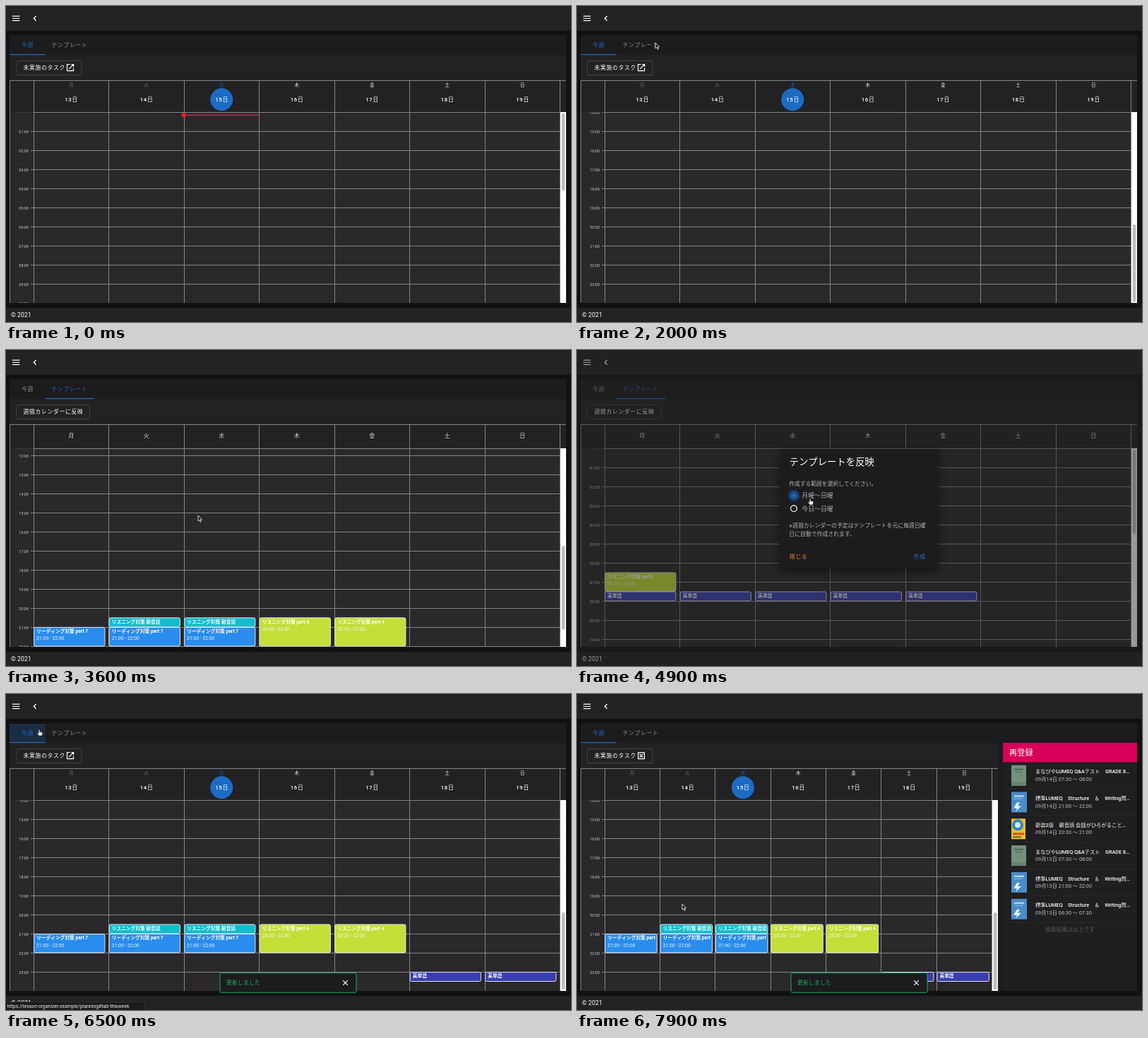
An HTML page with a canvas for the animation above (8 s loop, 800 px wide and 447 px high).

```html
<!DOCTYPE html>
<html lang="ja">
<head>
<meta charset="utf-8">
<title>週間スケジュール</title>
<style>
html, body { margin: 0; width: 100%; height: 100%; overflow: hidden; background: #121114; }
canvas { display: block; width: 800px; height: 447px; }
</style>
</head>
<body>
<canvas id="stage"></canvas>
<script>
const LOOP = 8000, W = 800, H = 447;
const canvas = document.getElementById('stage');
const ctx = canvas.getContext('2d');
const dpr = window.devicePixelRatio || 1;
canvas.width = W * dpr;
canvas.height = H * dpr;

const FONT = 'Roboto, "Noto Sans CJK JP", "Noto Sans CJK", sans-serif';
const SURFACE = '#222124', DARK = '#1c1b1e', LINE = '#858487', BLUE = '#1c6cc4';
const LIME = '#c4df38', INDIGO = '#393eb0', SKY = '#298dee', CYAN = '#13bccd';
const DAYS = [...'月火水木金土日'];
const HOUR = 27;
const PANEL_OPEN = 7200;

// day, start hour, end hour, colour, title
const EVENTS = [
  [0, 6.5, 7.5, LIME, 'リスニング対策 part4'],
  ...[0, 1, 2, 3, 4].map(d => [d, 7.5, 8, INDIGO, '英単語']),
  ...[1, 2].map(d => [d, 20.5, 21, CYAN, 'リスニング対策 朝音読']),
  ...[0, 1, 2].map(d => [d, 21, 22, SKY, 'リーディング対策 part 7']),
  ...[3, 4].map(d => [d, 20.5, 22, LIME, 'リスニング対策 part 4']),
  ...[5, 6].map(d => [d, 23, 23.5, INDIGO, '英単語'])
];

const BOOKS = [
  { title: 'まなびやLUMEQ Q&Aテスト　GRADE 8…', cover: 'green' },
  { title: '標準LUMEQ　Structure　＆　Writing問…', cover: 'blue' },
  { title: '新装2版　朝音読 会話がひろがること…', cover: 'yellow' }
];
const TASKS = [
  [0, '09月14日 07:30 〜 08:00'], [1, '09月14日 21:00 〜 22:00'],
  [2, '09月14日 20:30 〜 21:00'], [0, '09月13日 07:30 〜 08:00'],
  [1, '09月13日 21:00 〜 22:00'], [1, '09月13日 06:30 〜 07:30']
];

// Motion tracks: time followed by values
const POINTER = [
  [100, 530, 250], [700, 344, 175], [1700, 344, 175], [1900, 313, 141], [2000, 111, 52],
  [2300, 111, 52], [2400, 100, 53], [2600, 100, 53], [2850, 272, 234], [4000, 272, 234],
  [4300, 92, 85], [4450, 92, 85], [4750, 330, 210], [4950, 330, 210], [5250, 485, 291],
  [5600, 485, 291], [6000, 47, 50], [6600, 47, 50], [6900, 92, 85], [7250, 92, 85], [7600, 149, 297]
];
const WEEK_SCROLL = [[1050, 0], [1300, 234], [1500, 340], [1750, 378]];
const TEMPLATE_SCROLL = [
  [2800, 0], [2900, 16], [3100, 120], [3400, 265], [3600, 314], [3750, 340], [3900, 250], [4200, 0]
];
const TAB = [[2400, 0], [2700, 1], [6100, 1], [6400, 0]];
const DIALOG = [[4400, 0], [4550, 1], [5350, 1], [5550, 0]];
const SNACK = [[5550, 0], [5700, 1]];
const HAND = [[2350, 2650], [4200, 4480], [4700, 5000], [5200, 5600], [5950, 6650], [6850, 7300]];

const linear = k => k;
const smooth = k => k * k * (3 - 2 * k);

function track(keys, t, ease = smooth) {
  if (t <= keys[0][0]) return keys[0].slice(1);
  const i = keys.findIndex(k => k[0] > t);
  if (i < 0) return keys[keys.length - 1].slice(1);
  const a = keys[i - 1], b = keys[i];
  const k = ease((t - a[0]) / (b[0] - a[0]));
  return a.slice(1).map((v, n) => v + (b[n + 1] - v) * k);
}

const within = (t, a, b) => t >= a && t < b;

function rect(x, y, w, h, color) {
  ctx.fillStyle = color;
  ctx.fillRect(x, y, w, h);
}

function box(x, y, w, h, r, fill, stroke, width = 1) {
  ctx.beginPath();
  ctx.roundRect(x, y, w, h, r);
  if (fill) { ctx.fillStyle = fill; ctx.fill(); }
  if (stroke) { ctx.strokeStyle = stroke; ctx.lineWidth = width; ctx.stroke(); }
}

function disc(x, y, r, fill, stroke, width = 1) {
  box(x - r, y - r, r * 2, r * 2, r, fill, stroke, width);
}

const hline = (x, y, w, color = LINE) => rect(x, Math.floor(y), w, 1, color);
const vline = (x, y, h, color = LINE) => rect(Math.floor(x), y, 1, h, color);

function path(d, x, y, fill, stroke, width) {
  const p = new Path2D(d);
  ctx.save();
  ctx.translate(x, y);
  if (fill) { ctx.fillStyle = fill; ctx.fill(p); }
  if (stroke) { ctx.strokeStyle = stroke; ctx.lineWidth = width; ctx.stroke(p); }
  ctx.restore();
}

// y is the middle of the line
function text(s, x, y, size, color, { weight = 400, gap = 0, align = 'left' } = {}) {
  ctx.font = `${weight} ${size}px ${FONT}`;
  ctx.letterSpacing = gap + 'px';
  ctx.textAlign = align;
  ctx.fillStyle = color;
  ctx.fillText(s, x, y + size * 0.37);
}

function clipped(x, y, w, h, draw) {
  ctx.save();
  ctx.beginPath();
  ctx.rect(x, y, w, h);
  ctx.clip();
  draw();
  ctx.restore();
}

const clock = h => String(Math.floor(h)).padStart(2, '0') + (h % 1 ? ':30' : ':00');

function drawEvent([day, from, to, color, title], x0, colW, y0) {
  const x = x0 + day * colW + 0.5, y = y0 + from * HOUR;
  const w = (colW - 1) * 0.95, h = (to - from) * HOUR;
  box(x + 0.2, y, w, h - 0.5, 2, color, '#f4f4f6', 0.9);
  clipped(x, y, w - 0.5, h, () => {
    text(title, x + 3.8, y + 5.3, 6.7, '#fff', { weight: 700 });
    if (to - from >= 1) text(`${clock(from)} - ${clock(to)}`, x + 3.8, y + 15.6, 6.8, '#f2f2f4');
  });
}

function drawHeader(week, x0, colW, top) {
  DAYS.forEach((day, i) => {
    const cx = x0 + (i + 0.5) * colW;
    if (!week) return text(day, cx, 121.5, 8, '#dddcde', { align: 'center' });
    const color = i < 2 ? '#747376' : i === 2 ? '#1c5fae' : '#f2f2f2';
    text(day, cx, 111.3, 6.5, color, { align: 'center' });
    if (i === 2) disc(cx, 132.3, 16, BLUE);
    text(13 + i + '日', cx + 0.3, 132.3, 7.8, '#fff', { weight: 500, gap: 0.7, align: 'center' });
  });
  hline(14, top, 25, '#3c3b3e');
}

function drawCalendar(week, scroll, events, right) {
  const top = week ? 150.5 : 139.5, x0 = 39, end = right - 8.5;
  const colW = (end - x0) / 7, view = 420 - top, y0 = top - scroll;
  rect(5, 69, right - 5, 351, SURFACE);
  rect(5, Math.floor(top), right - 5, 420 - Math.floor(top), '#2a282b');
  drawHeader(week, x0, colW, top);
  for (let i = 0; i <= 7; i++) vline(x0 + i * colW, 105, 315);

  clipped(5, top, right - 5, view, () => {
    for (let h = 1; h < 24; h++) {
      const y = y0 + h * HOUR;
      hline(35, y, end - 35);
      text(clock(h), 32, y + 0.6, 5.5, '#d0cfd1', { align: 'right' });
    }
    events.forEach(e => drawEvent(e, x0, colW, y0));
    if (week) {
      const x = x0 + 2 * colW, y = y0 + 3.8;
      rect(x, y - 0.6, colW, 1.2, '#d8344c');
      disc(x - 0.3, y, 3.2, '#ee1c28');
    }
  });

  hline(39, top, end - 39);
  hline(5, 105, right - 5);
  vline(5, 105, 315);
  rect(end + 0.5, Math.floor(top), 8, 420 - Math.floor(top), '#fff');
  const thumb = view * view / 648;
  box(end + 2.3, top + 1.2 + scroll * view / 648, 4.6, thumb - 2.4, 2.3, '#bdbdbf');
}

function drawButton(week, open) {
  box(14.5, 77.5, week ? 92.5 : 104, 20, 2, null, '#454447', 0.9);
  text(week ? '未実施のタスク' : '週間カレンダーに反映', 24.5, 87.3, 7.8, '#fff', { gap: 0.7 });
  if (!week) return;
  if (open) path('M-4.4-4.4h8.8v8.8h-8.8zM-2.3-2.3L2.3 2.3M2.3-2.3L-2.3 2.3', 91, 87.2, null, '#fff', 1.2);
  else path('M-.5-4.5h-4v9h9v-4M1.3-4.6h3.3v3.3M4.4-4.4L-2 2', 91, 87.2, null, '#fff', 1.2);
}

function drawCover(kind, x, y) {
  if (kind === 'green') {
    rect(x, y, 21, 29, '#74907e');
    rect(x + 4, y + 5, 13, 1.5, '#3f5a4b');
    rect(x + 6, y + 9, 9, 1, '#4d6858');
    rect(x, y + 24, 21, 5, '#67836f');
  } else if (kind === 'blue') {
    rect(x, y, 22, 29, '#4a8cc8');
    rect(x + 4, y + 5, 14, 2, '#c4dcf0');
    rect(x + 4, y + 9, 12, 1, '#9cc4e6');
    path('M8 15L3 23H8L6 28L14 20H9L12 15Z', x, y, '#e8f2fa');
  } else {
    rect(x, y, 20, 29, '#f0bd2c');
    disc(x + 9, y + 9, 8, '#2a86c8');
    disc(x + 9, y + 9, 4, '#dcebf2');
    rect(x + 2, y + 20, 16, 3, '#d8502c');
    rect(x + 2, y + 25, 12, 2, '#4c6a38');
  }
}

function drawPanel() {
  rect(596, 69, 197, 351, DARK);
  rect(603, 69, 190, 351, '#1f1e21');
  rect(603, 69, 190, 27.5, '#d80058');
  text('再登録', 612, 83, 11.2, '#fff');
  TASKS.forEach(([book, time], i) => {
    const y = 115.2 + i * 37.8;
    drawCover(BOOKS[book].cover, 615, y - 14.5);
    text(BOOKS[book].title, 649, y - 5.6, 7.3, '#fff', { weight: 500 });
    text(time, 649, y + 4.9, 7.3, '#c2c1c4');
    rect(603, y + 18.5, 190, 0.6, '#302f32');
  });
  text('検索結果は以上です', 698, 333, 7.8, '#58575a', { align: 'center' });
}

function drawChrome(tab, hover) {
  rect(0, 0, W, H, '#121114');
  rect(0, 35, W, 3, '#0d0c0f');
  rect(0, 0, W, 35.5, SURFACE);
  path('M9 14.3H19.3M9 17.5H19.3M9 20.7H19.3', 0, 0, null, '#fff', 1.2);
  path('M42.6 14.2L39.4 17.5L42.6 20.8', 0, 0, null, '#fff', 1.4);
  rect(0, 427, W, 20, SURFACE);
  text('© 2021', 7, 437, 8.8, '#fff');

  rect(5, 42, 788, 27, DARK);
  if (hover === 'week') rect(5, 42, 50.5, 27, 'rgba(25,118,210,.2)');
  if (hover === 'template') rect(55.5, 42, 69.5, 27, 'rgba(25,118,210,.2)');
  const onWeek = tab.target === 0;
  text('今週', 22, 55.6, 7.8, onWeek ? BLUE : '#8f8e91', { gap: 0.7 });
  text('テンプレート', 64.5, 55.6, 7.8, onWeek ? '#8f8e91' : BLUE, { gap: 0.7 });
}

function drawDialog(alpha, ripple) {
  if (!alpha) return;
  rect(0, 0, W, H, `rgba(33,33,33,${0.46 * alpha})`);
  ctx.save();
  ctx.globalAlpha = alpha;
  ctx.shadowColor = 'rgba(0,0,0,.45)';
  ctx.shadowBlur = 14 * dpr;
  ctx.shadowOffsetY = 5 * dpr;
  box(287, 140, 224.5, 167.5, 2.5, DARK);
  ctx.shadowColor = 'transparent';
  text('テンプレートを反映', 300.5, 158, 13.4, '#fff');
  text('作成する範囲を選択してください。', 300.3, 189.6, 7.75, '#b5b4b7');
  if (ripple) disc(307, 206, 8.5, '#17365c');
  disc(307, 206, 4.4, null, '#2079d6', 1.2);
  disc(307, 206, 2.4, '#2079d6');
  disc(307, 224.3, 4.4, null, '#fff', 1.2);
  text('月曜〜日曜', 318.3, 206, 8.9, '#b0afb2');
  text('今日〜日曜', 318.3, 224.3, 8.9, '#b0afb2');
  text('※週間カレンダーの予定はテンプレートを元に毎週日曜', 300.3, 247.6, 7.86, '#b5b4b7');
  text('日に自動で作成されます。', 300.3, 260, 7.86, '#b5b4b7');
  text('閉じる', 301, 292.3, 7.8, '#ee8a1e', { weight: 500, gap: 0.7 });
  text('作成', 476.7, 292.3, 7.8, '#1f74cc', { weight: 500, gap: 0.7 });
  ctx.restore();
}

function drawSnack(alpha) {
  if (!alpha) return;
  ctx.save();
  ctx.globalAlpha = alpha;
  box(303, 394.7, 193, 27.6, 2, DARK, '#13b152', 1);
  text('更新しました', 312, 408.5, 7.8, '#15b85a', { gap: 0.2 });
  path('M-3.3-3.3L3.3 3.3M3.3-3.3L-3.3 3.3', 480.5, 408.5, null, '#fff', 1.2);
  ctx.restore();
}

function drawStatus(hover) {
  if (!hover) return;
  const end = hover === 'week' ? 'thisweek' : 'template';
  box(-2, 435.7, 198.5, 14, 2, '#1b1a1d', '#39383b', 0.7);
  text('https://lesson-organizer.example/planning#tab-' + end, 1.5, 441.6, 6.9, '#f0f0f0');
}

function drawPointer(t) {
  if (t < 100) return;
  const [x, y] = track(POINTER, t);
  ctx.lineJoin = 'round';
  if (HAND.some(([a, b]) => within(t, a, b))) {
    path('M-.9 .8Q0-.4 .9 .8V3.4L4.3 4.2Q5 4.5 4.8 5.6L4 9H-.6L-3 5.6Q-3.2 4.6-2 4.8L-.9 5.8Z',
      x, y, '#fff', '#111', 0.6);
  } else {
    path('M0 0V8L1.9 6.3L3.2 9.3L4.5 8.8L3.2 5.9H5.6Z', x, y, '#111', '#fff', 0.8);
  }
  ctx.lineJoin = 'miter';
}

function draw(t) {
  const [p] = track(TAB, t);
  const tab = { p, target: within(t, 2400, 6100) ? 1 : 0 };
  const hover = within(t, 2350, 2650) ? 'template' : within(t, 5980, 6650) ? 'week' : null;
  const open = t >= PANEL_OPEN;

  ctx.setTransform(dpr, 0, 0, dpr, 0, 0);
  drawChrome(tab, hover);
  clipped(5, 69, 788, 351, () => {
    if (p < 1) {
      ctx.save();
      ctx.translate(-788 * p, 0);
      const [scroll] = track(WEEK_SCROLL, t, linear);
      drawCalendar(true, scroll, t > 5500 ? EVENTS : [], open ? 596 : 793);
      drawButton(true, open);
      if (open) drawPanel();
      ctx.restore();
    }
    if (p > 0) {
      ctx.save();
      ctx.translate(788 * (1 - p), 0);
      const [scroll] = track(TEMPLATE_SCROLL, t, linear);
      drawCalendar(false, scroll, EVENTS, 793);
      drawButton(false);
      ctx.restore();
    }
  });
  rect(5 + 50.5 * p, 68, 50.5 + 19 * p, 1.2, '#1a6cc0');
  drawDialog(track(DIALOG, t)[0], within(t, 4800, 5300));
  drawSnack(track(SNACK, t)[0]);
  drawStatus(hover);
  drawPointer(t);
}

const start = performance.now();
function frame() {
  draw((performance.now() - start) % LOOP);
  requestAnimationFrame(frame);
}
frame();
</script>
</body>
</html>
```
